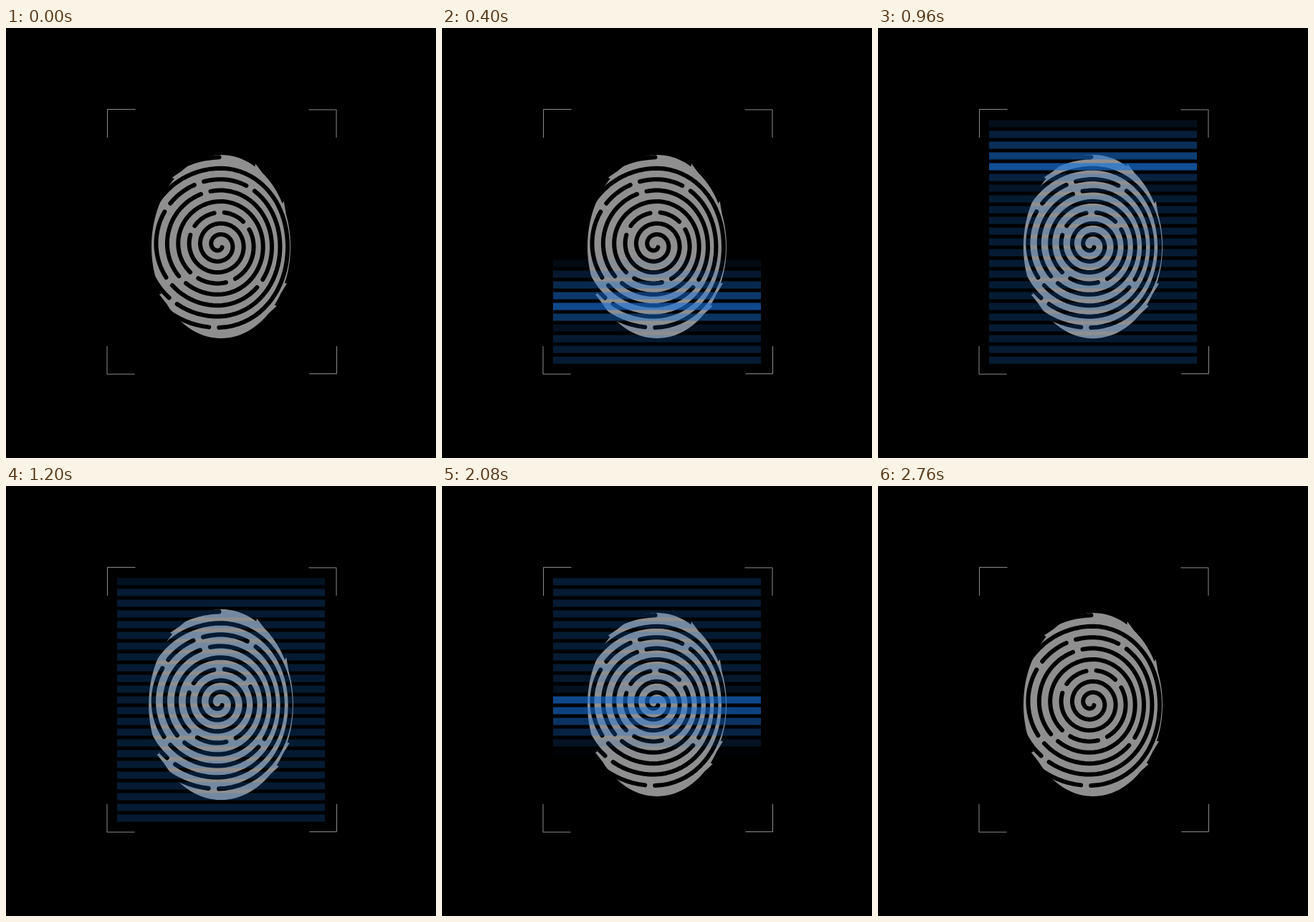
Write an HTML page that moves like this. It is 600 by 600 pixels and loops after 2.8 s.

```html
<!DOCTYPE html>
<html lang="en">
<head>
<meta charset="utf-8">
<title>Fingerprint scan</title>
<style>
  html, body { margin: 0; width: 100%; height: 100%; overflow: hidden; background: #000; }
  svg { display: block; width: 100vw; height: 100vh; }
  #corners { fill: none; stroke: #8c8c8c; stroke-width: 1; }
  #skin { fill: #8f8f8f; }
  #grooves { fill: none; stroke: #000; stroke-width: 6; stroke-linecap: round; stroke-linejoin: round; }
  #bars { fill: rgb(25, 116, 220); }
</style>
</head>
<body>
<svg viewBox="0 0 600 600">
  <path id="corners" d="M141.5 153V113.5H180.5M422.5 114H461V153M141 444V483H179.5M423.5 482.5H461.5V444"/>
  <g id="print">
    <path id="skin"/>
    <path id="grooves"/>
  </g>
  <g id="bars"></g>
</svg>
<script>
const LOOP = 2800, FRAME = 40, BARS = 23, TAU = 2 * Math.PI;
const $ = id => document.getElementById(id);
const clamp = (v, lo, hi) => Math.max(lo, Math.min(hi, v));
const lerp = (a, b, p) => a + (b - a) * clamp(p, 0, 1);
const toPath = points => 'M' + points.map(p => p.map(v => v.toFixed(2)).join(' ')).join('L');

// Outline: an ellipse with small barbs; the sign tells which way a barb trails
const rim = (a, k = 1) => [300 + 97 * k * Math.cos(a), 305 + 128 * k * Math.sin(a)];
const barbs = [[-2.32, 1], [-1.07, 1], [-0.5, 1], [0.4, 1], [0.68, 1], [2.34, -1], [2.61, -1]];

function outline() {
  const oval = Array.from({ length: 120 }, (_, i) => rim(i / 120 * TAU));
  const spikes = barbs.map(([a, way]) =>
    [rim(a, 1.03), rim(a + 0.14 * way), rim(a + 0.14 * way, 0.95), rim(a + 0.02 * way, 0.97)]);
  // Same winding everywhere, so overlaps stay filled
  spikes.forEach((s, i) => { if (barbs[i][1] < 0) s.reverse(); });
  return [oval, ...spikes].map(s => toPath(s) + 'Z').join('');
}

// One spiral groove: turn 0 points left, growing clockwise, tighter on the right
function spiral(turn) {
  const a = Math.PI + turn * TAU;
  const r = 11 + 15.4 * turn;
  const squeeze = 1 - 0.0018 * Math.max(0, r - 33) * Math.max(0, Math.cos(a)) ** 2;
  return [297.5 + r * squeeze * Math.cos(a), 303 + r * squeeze * Math.sin(a)];
}

// Turns at which ridges join across the groove
const bridges = [2.08, 2.25, 2.4, 2.7, 2.86, 3.88, 4.21, 4.62, 4.9, 5.1, 5.2, 5.33, 5.86, 6.76];

function grooves(from, to) {
  const ends = [from, ...bridges, to];
  return ends.slice(1).map((stop, i) => {
    const gap = turn => bridges.includes(turn) ? 7 / (TAU * (11 + 15.4 * turn)) : 0;
    const a = ends[i] + gap(ends[i]), b = stop - gap(stop);
    const n = Math.ceil((b - a) * 80);
    return toPath(Array.from({ length: n + 1 }, (_, j) => spiral(a + (b - a) * j / n)));
  }).join('');
}

$('skin').setAttribute('d', outline());
$('grooves').setAttribute('d', grooves(-0.4, 7.25));

const bars = Array.from({ length: BARS }, (_, k) => {
  const bar = document.createElementNS('http://www.w3.org/2000/svg', 'rect');
  const box = { x: 155, y: 128.5 + 15 * k, width: 290, height: 10 };
  for (const name in box) bar.setAttribute(name, box[name]);
  return $('bars').appendChild(bar);
});

// Bar opacity by distance from the scan head: ramp up, drop, settle
function glow(q) {
  if (q < 0) return lerp(0, 0.7, 1 + q / 5);
  if (q < 1.2) return lerp(0.7, 0.12, q / 1.2);
  return lerp(0.12, 0.23, q / 1.2 - 1);
}

// Eased swell to 1.05 and back over 400 ms
const swell = (t, start) => 0.025 * (1 - Math.cos(TAU * clamp((t - start) / 400, 0, 1)));

function scale(el, s, x, y) {
  el.setAttribute('transform', `translate(${x} ${y}) scale(${s}) translate(${-x} ${-y})`);
}

function draw(t) {
  const filling = t < 1480;
  const head = filling ? 27 - t / 42 : 21.05 - (t - 1680) / 40.4;
  bars.forEach((bar, k) => bar.setAttribute('opacity', glow(filling ? k - head : head - k)));
  scale($('corners'), 1 + swell(t, 0) + swell(t, 1575), 301.5, 298);
  scale($('print'), 1 + swell(t, 940), 300, 305);
}

const begin = performance.now();
function tick() {
  const t = (performance.now() - begin) % LOOP;
  draw(Math.floor(t / FRAME) * FRAME);
  requestAnimationFrame(tick);
}
tick();
</script>
</body>
</html>
```
